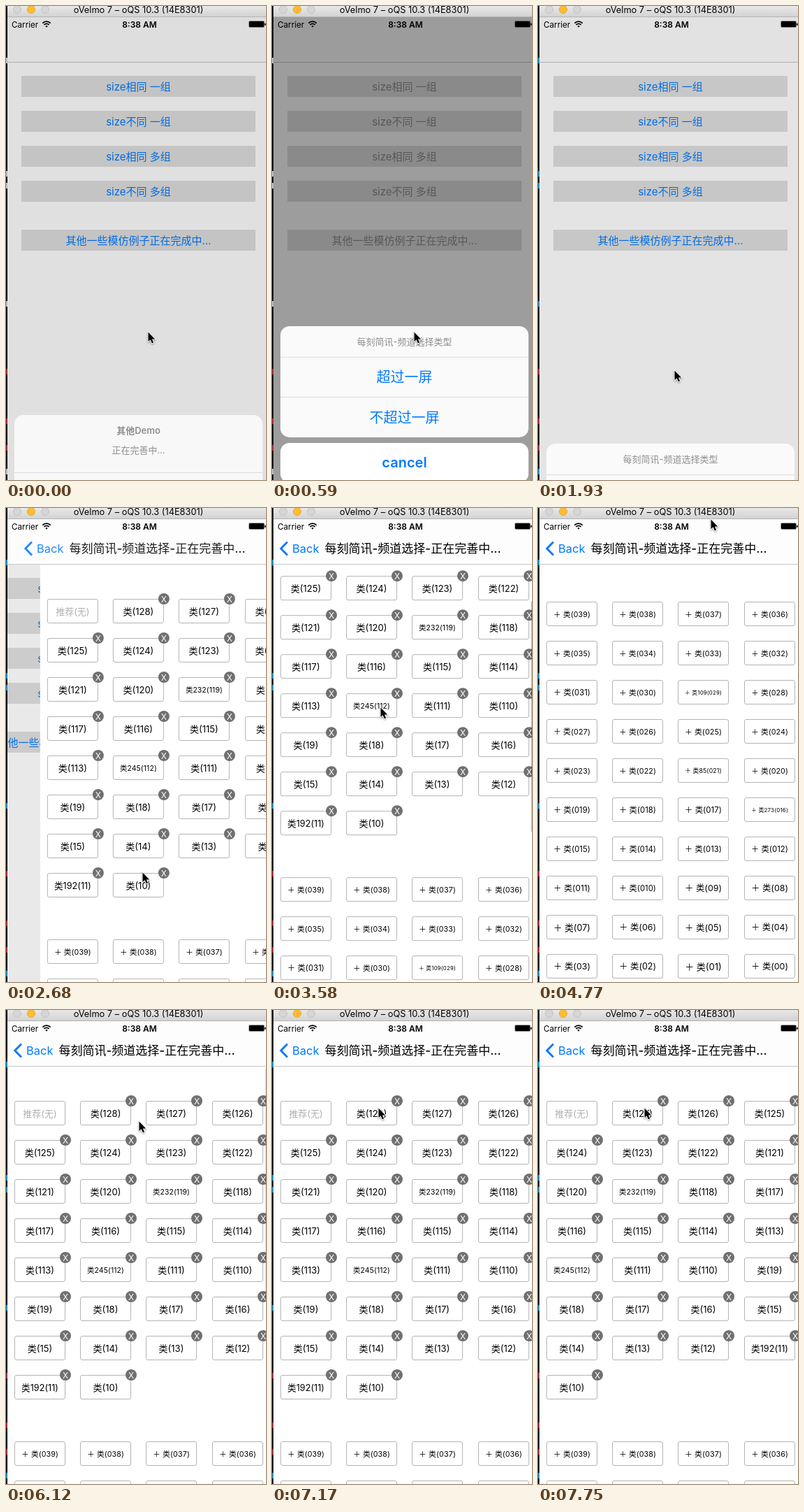
These frames come from a looping animation (372 by 678 pixels, 8000 ms). An HTML page:

```html
<!DOCTYPE html>
<html lang="zh-CN">
<head>
<meta charset="utf-8">
<title>Channel picker</title>
<style>
  html, body { margin: 0; width: 100%; height: 100%; overflow: hidden; background: #000; }
  svg { display: block; }
  text { font-family: Inter, 'Noto Sans CJK SC', 'Noto Sans CJK JP', sans-serif; white-space: pre; }
  .mid { text-anchor: middle; }
  .blue { fill: #007aff; }
  .grey { fill: #8f8f8f; }
  .medium { font-weight: 500; }
  .bold { font-weight: 600; }
  #cursor { filter: drop-shadow(0 1px 1px rgba(0, 0, 0, .4)); }
</style>
</head>
<body>
<svg id="stage" width="372" height="678" viewBox="0 0 372 678">
  <defs>
    <linearGradient id="chrome" x2="0" y2="1">
      <stop stop-color="#e8e8e8"/><stop offset="1" stop-color="#d3d3d3"/>
    </linearGradient>
  </defs>
  <rect width="372" height="678" fill="#000"/>
  <g id="code"></g>

  <svg x="2" y="0" width="370" height="678" viewBox="2 0 370 678">
    <rect x="2" width="370" height="678" fill="#fff"/>
    <g id="home"></g>
    <rect id="shade" x="2" y="81" width="370" height="597"/>
    <g id="list">
      <rect x="2" y="81" width="375" height="597" fill="#fff"/>
      <g id="cells"></g>
      <rect id="bar" x="371" width="2.5" height="330" rx="1" fill="#000"/>
    </g>

    <rect x="2" y="16" width="370" height="64" fill="#fdfdfd"/>
    <rect x="2" y="80" width="370" height="1" fill="#c6c6c6"/>
    <g id="nav">
      <path d="M22 48.500L12.800 58 22 67.500" fill="none" stroke="#007aff" stroke-width="2.800"/>
      <text x="29" y="64" font-size="16.500" class="blue">Back</text>
      <text x="201.500" y="64" font-size="17" class="mid medium">每刻简讯-频道选择-正在完善中...</text>
    </g>

    <text x="8" y="31" font-size="11.700">Carrier</text>
    <g fill="none" stroke="#000" stroke-width="1.700">
      <path d="M52.300 24.600a8 8 0 0 1 11.400 0M54.400 26.900a5 5 0 0 1 7.200 0"/>
      <path d="M56.300 28.800L58 30.800 59.700 28.800a2.400 2.400 0 0 0-3.400 0z" fill="#000" stroke="none"/>
    </g>
    <text x="191" y="31" font-size="12" class="mid bold">8:38 AM</text>
    <rect x="347.500" y="21.500" width="22" height="9" rx="1.500" fill="none" stroke="#000" stroke-opacity=".4"/>
    <rect x="348" y="22" width="21" height="8" rx="1"/>
    <rect x="370" y="24.500" width="1.500" height="3.500" rx=".7"/>

    <rect id="dim" x="2" y="16" width="370" height="662"/>

    <g id="sheetA">
      <rect x="12" width="355" height="200" rx="13" fill="#f8f8f8"/>
      <text x="189.500" y="26.500" font-size="13" class="mid grey bold">其他Demo</text>
      <text x="189.500" y="54.500" font-size="13" class="mid grey">正在完善中...</text>
      <rect x="12" y="82" width="355" height="1" fill="#dcdcdc"/>
    </g>
    <g id="sheetB">
      <rect x="12" width="355" height="159" rx="13" fill="#fafafa"/>
      <text x="189.500" y="27" font-size="13" class="mid grey">每刻简讯-频道选择类型</text>
      <path d="M12 44.500h355M12 101.500h355" stroke="#dcdcdc"/>
      <text x="189.500" y="80.500" font-size="20" class="mid blue">超过一屏</text>
      <text x="189.500" y="138" font-size="20" class="mid blue">不超过一屏</text>
      <rect x="12" y="167" width="355" height="57" rx="13" fill="#fff"/>
      <text x="189.500" y="202.500" font-size="20" class="mid blue bold">cancel</text>
    </g>

    <rect x="2" width="370" height="15" fill="url(#chrome)"/>
    <rect x="2" y="15" width="370" height="1" fill="#b4b4b4"/>
    <g fill="#d6d6d6" stroke="#c2c2c2">
      <circle cx="16" cy="5" r="5.500"/>
      <circle cx="36" cy="5" r="5.500" fill="#ffbd2e" stroke="#e6a935"/>
      <circle cx="56" cy="5" r="5.500"/>
    </g>
    <text x="189.500" y="10" font-size="12.800" class="mid">oVelmo 7 – oQS 10.3 (14E8301)</text>
  </svg>

  <path id="cursor" d="M0 0V13.500L3.100 10.700 5.300 15.800 7.600 14.900 5.400 9.900H9.700Z"
        stroke="#fff" stroke-width="1.800" paint-order="stroke"/>
</svg>

<script>
const $ = id => document.getElementById(id);
const LOOP = 8000, TICK = 149; // the screen advances once per tick

function add(parent, tag, attrs, text) {
  const el = document.createElementNS('http://www.w3.org/2000/svg', tag);
  for (const name in attrs) el.setAttribute(name, attrs[name]);
  if (text) el.textContent = text;
  return parent.appendChild(el);
}
const move = (el, x, y) => el.setAttribute('transform', `translate(${x} ${y})`);
const fade = (el, a) => el.setAttribute('opacity', a);

// Progress 0..1 of tick k between a and b, plain or eased
const ramp = (k, a, b) => Math.min(1, Math.max(0, (k - a) / (b - a)));
const easeOut = (k, a, b, power) => 1 - (1 - ramp(k, a, b)) ** power;
const smooth = (k, a, b) => { const t = ramp(k, a, b); return t * t * (3 - 2 * t); };

// Editor text peeping out at the left edge
const mark = (y, fill) => add($('code'), 'rect', { y, width: 2, height: 8, fill });
const words = [74, 236, 253, 422, 662].map(y => mark(y, '#bbb'));
[519, 590, 628].forEach(y => mark(y, '#a3262f'));

const links = [
  'size相同 一组', 'size不同 一组', 'size相同 多组', 'size不同 多组', '其他一些模仿例子正在完成中...'
].map((label, i) => {
  const y = 100 + 50 * i + (i > 3 ? 20 : 0);
  add($('home'), 'rect', { x: 22, y, width: 335, height: 30, fill: '#dfdfdf' });
  return add($('home'), 'text', { x: 189.5, y: y + 20.5, 'font-size': 15, class: 'mid' }, label);
});

const slot = (i, top) => [12 + Math.round(94.2 * (i % 4)), top + 56 * Math.floor(i / 4)];

function cell(label, colour, closable) {
  const g = add($('cells'), 'g', {});
  add(g, 'rect', { x: .5, y: .5, width: 72, height: 34, rx: 2.5, fill: '#fff', stroke: '#b4b4b4' });
  const text = add(g, 'text', { x: 36.5, 'font-size': 13, class: 'mid', fill: colour }, label);
  // Long labels shrink to fit, with slightly wider tracking
  const width = text.getComputedTextLength();
  const scale = Math.min(1, 53 / width) ** 1.1;
  text.setAttribute('font-size', 13 * scale);
  text.setAttribute('y', 18 + 4.7 * scale);
  if (scale < 1) text.setAttribute('letter-spacing', (53 - width * scale) / label.length);
  if (closable) {
    add(g, 'circle', { cx: 73, r: 8, fill: '#707070' });
    add(g, 'text', { x: 73, y: 4.5, 'font-size': 12, class: 'mid', fill: '#fff' }, 'X');
  }
  return g;
}

const extra = { 119: '232', 112: '245', 11: '192', '029': '109', '021': '85', '016': '273' };
const label = id => `类${extra[id] || ''}(${id})`;

const chosen = [cell('推荐(无)', '#b0b0b0')];
for (let n = 28; n >= 0; n--) chosen.push(cell(label('1' + n), '#000', true));
for (let n = 39; n >= 0; n--) move(cell('＋ ' + label('0' + n), '#000'), ...slot(39 - n, 617));

// Pointer trips: start tick, end tick, destination
const trips = [
  [4, 9, 195, 521], [18, 24, 155, 285], [24, 31, 247, 16], [39, 41, 190, 159], [44, 48, 152, 140]
];
function pointer(k) {
  let x = 203, y = 466;
  for (const [a, b, u, v] of trips) {
    const p = smooth(k, a, b);
    x += (u - x) * p;
    y += (v - y) * p;
  }
  return [x, y];
}

function draw(k) {
  const shownA = .3 * (1 - ramp(k, 0, 1));
  const shownB = easeOut(k, 2, 5, 3) - easeOut(k, 12.06, 14, 2);
  const push = easeOut(k, 16, 20, 3);
  const scroll = 483 * (smooth(k, 21.36, 31) - smooth(k, 36, 40));
  const barShown = ramp(k, 22, 23) - ramp(k, 30, 32) + ramp(k, 36, 37) - ramp(k, 40, 42);
  const gone = smooth(k, 49, 52);

  for (const word of words) word.setAttribute('fill', k < 7 ? '#bbb' : '#1687b8');
  const tint = k >= 3 && k < 13 ? '#8e8e8e' : '#007aff';
  for (const link of links) link.setAttribute('fill', tint);

  move($('home'), -112 * push, 0);
  fade($('shade'), .1 * push);
  move($('list'), 375 * (1 - push), 0);
  move($('nav'), 120 * (1 - push), 0);
  fade($('nav'), push);

  move($('cells'), 0, -scroll);
  chosen.forEach((g, i) => {
    const [x, y] = slot(i, 130), [u, v] = slot(Math.max(i - 1, 0), 130);
    const p = i > 1 ? gone : 0;
    move(g, x + (u - x) * p, y + (v - y) * p);
  });
  fade(chosen[1], 1 - gone);
  $('bar').setAttribute('y', 84 + scroll * .555);
  fade($('bar'), .35 * barShown);

  fade($('dim'), .4 * (shownA + shownB));
  move($('sheetA'), 0, 690 - 350 * shownA);
  move($('sheetB'), 0, 690 - 241 * shownB);
  move($('cursor'), ...pointer(k).map(v => v + .5));
}

function frame() {
  draw(Math.floor((performance.now() % LOOP + 8) / TICK));
  requestAnimationFrame(frame);
}
frame();
</script>
</body>
</html>
```
